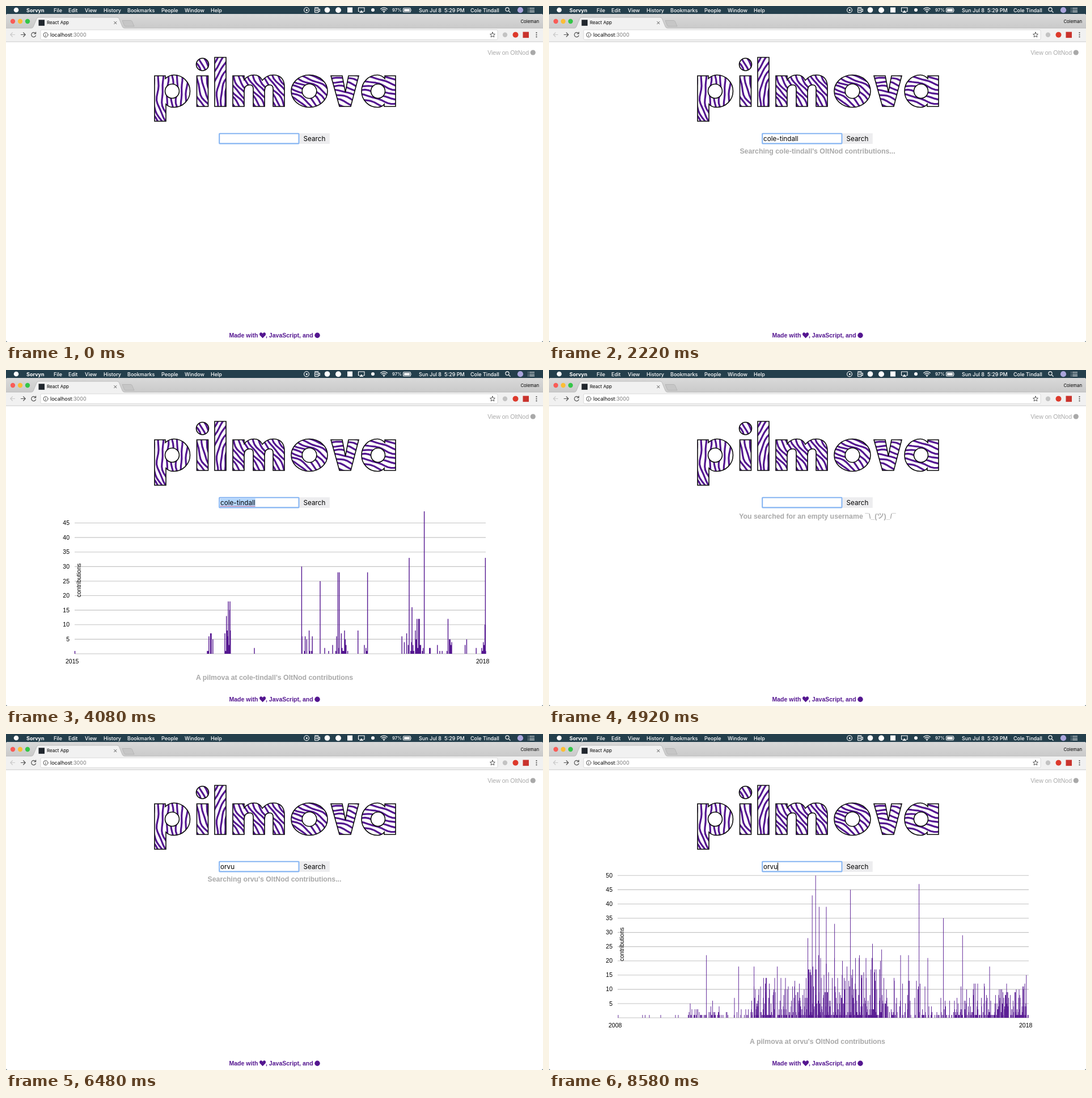
An HTML page that plays this animation: 947x592 px, repeating every 8640 ms.

```html
<!DOCTYPE html>
<html lang="en">
<head>
<meta charset="utf-8">
<title>React App</title>
<style>
html, body { margin: 0; width: 100%; height: 100%; overflow: hidden; background: #fff; }
svg { display: block; width: 947px; height: 592px; }
text { font-family: 'Liberation Sans', 'Noto Sans CJK JP', sans-serif; font-size: 10.52px; white-space: pre; }
.ui text { font-family: Inter, sans-serif; font-size: 9px; }
.menu text { fill: #fff; font-weight: 500; }
.bold { font-weight: 700; }
.mid { text-anchor: middle; }
.end { text-anchor: end; }
text.field { font-family: Inter, sans-serif; font-size: 11.7px; }
text.status { font-size: 12.31px; font-weight: 700; fill: #a9a9a9; text-anchor: middle; }
.line { fill: none; stroke-linecap: round; stroke-linejoin: round; }
</style>
</head>
<body>
<svg viewBox="0 0 947 592">
  <rect width="947" height="592" fill="#243f4c"/>
  <defs>
    <linearGradient id="strip" x2="0" y2="1">
      <stop stop-color="#d9d9d9"/><stop offset="1" stop-color="#cacaca"/>
    </linearGradient>
  </defs>
  <rect y="14" width="947" height="578" rx="3" fill="#fff"/>
  <path d="M0 39V17Q0 14 3 14H944Q947 14 947 17V39Z" fill="url(#strip)"/>

  <g class="ui menu" id="menu">
    <circle cx="18" cy="7" r="4.3" fill="#fff"/>
    <g fill="none" stroke="#fff" stroke-width="1.1">
      <circle cx="530" cy="7.2" r="4.4"/>
      <rect x="544.5" y="4" width="6.5" height="7.5" rx="1"/>
      <path d="M551 5.5H553.3V9.5H551M544 2.8H551.5M546.7 6V9.5M549 6V9.5"/>
      <path d="M623.5 9.5H621.5V3H632V9.5H630"/>
      <path d="M660.3 5.4Q666.5 .2 672.7 5.4M662.3 7.6Q666.5 4.2 670.7 7.6M664.4 9.6Q666.5 8 668.6 9.6" stroke-width="1.3"/>
      <rect x="700.5" y="3.8" width="13" height="7" rx="1.4"/>
      <circle cx="884" cy="6" r="3.1"/>
      <path d="M886.3 8.3L889.5 11.5M923 4H932M923 7.2H932M923 10.4H932M920.3 4H921.5M920.3 7.2H921.5M920.3 10.4H921.5"/>
    </g>
    <g fill="#fff">
      <rect x="529" y="6" width="2.6" height="2.6"/>
      <circle cx="566.5" cy="7" r="4.8"/>
      <circle cx="586" cy="7.2" r="5"/>
      <rect x="602" y="2.5" width="9" height="9"/>
      <path d="M623 11.8L626.8 7.6L630.6 11.8Z"/>
      <circle cx="647" cy="7" r="3"/>
      <circle cx="666.5" cy="11" r="1"/>
      <rect x="702" y="5.2" width="10" height="4.2"/>
      <path d="M714.5 6Q716 7.2 714.5 8.6Z"/>
    </g>
    <circle cx="907" cy="7.2" r="5.1" fill="#a9a5dc"/>
  </g>

  <g class="ui">
    <circle cx="12" cy="27" r="4.2" fill="#f95c57"/>
    <circle cx="25" cy="27" r="4.2" fill="#fcbd36"/>
    <circle cx="38" cy="27" r="4.2" fill="#34c648"/>
    <path d="M205 25.5H220Q221.5 25.5 222.3 27L226 35.7H211Q209.3 35.7 208.7 34.5Z" fill="#c6c6c6" stroke="#b1b1b1" stroke-width=".8"/>
    <rect y="39" width="947" height="24" fill="#f1f1f1"/>
    <path d="M0 39H45Q47.5 38.6 48.5 36L54 22.5Q55 20 57.5 20H196Q198.5 20 199.5 22.5L205 36Q206 38.6 208.5 39H947" fill="#f1f1f1" stroke="#b4b4b4" stroke-width=".8"/>
    <rect x="50" y="38.5" width="154" height="2" fill="#f1f1f1"/>
    <rect x="57.5" y="24.3" width="10.5" height="10.5" fill="#20262d"/>
    <text x="72" y="32.3" style="font-size:8px">React App</text>
    <path d="M190.7 27.5L194.9 31.7M194.9 27.5L190.7 31.7" class="line" stroke="#555" stroke-width="1"/>
    <text x="940" y="30.3" class="end" style="font-size:7.8px">Coleman</text>
    <path d="M0 63H947" stroke="#c6c6c6" stroke-width=".9"/>
    <rect x="61" y="42" width="806" height="17.3" rx="2" fill="#fff" stroke="#d2d2d2" stroke-width=".8"/>
    <g class="line" stroke="#555" stroke-width="1.2">
      <path d="M15.5 50.5H8M11.3 47L7.8 50.5L11.3 54" stroke="#c9c9c9"/>
      <path d="M26.5 50.5H34M30.7 47L34.2 50.5L30.7 54"/>
      <path d="M52 48.2A4 4 0 1 0 52.5 52M52.6 46V49H49.6"/>
      <circle cx="70" cy="50.8" r="4" stroke-width="1"/>
      <path d="M70 50.5V52.8M70 48.7V48.8" stroke-width="1.1"/>
      <path d="M858 46.2L859.3 49.2L862.4 49.5L860.1 51.6L860.8 54.8L858 53.1L855.2 54.8L855.9 51.6L853.6 49.5L856.7 49.2Z" stroke-width="1"/>
    </g>
    <text x="78" y="54">localhost<tspan fill="#777">:3000</tspan></text>
    <circle cx="880" cy="50.8" r="4.2" fill="#c3c3c3"/>
    <circle cx="898.5" cy="50.8" r="5" fill="#dd3a2c"/>
    <rect x="911.5" y="45.6" width="10.5" height="10.5" fill="#c9332d"/>
    <g fill="#555"><circle cx="935.5" cy="47.2" r="1.1"/><circle cx="935.5" cy="50.8" r="1.1"/><circle cx="935.5" cy="54.4" r="1.1"/></g>
  </g>

  <text x="922" y="85.7" class="end" fill="#a9a9a9">View on OltNod</text>
  <circle cx="929.3" cy="82" r="4.6" fill="#a9a9a9"/>

  <g id="logo"></g>

  <rect x="517.8" y="224.3" width="53" height="18.6" fill="#ededef"/>
  <rect x="376.2" y="224.8" width="140.3" height="17.6" rx=".8" fill="#fff" stroke="#86b5f2" stroke-width="2.1"/>
  <rect id="selection" x="378" y="226.3" height="15" fill="#b3d6fc"/>
  <path id="squiggle" stroke="#e0455f" stroke-width="1.3" stroke-dasharray="1.4 1.2"/>
  <text id="input" class="field" x="378" y="238"></text>
  <rect id="caret" y="226.6" width="1" height="14" fill="#000"/>
  <text x="544" y="238" class="field mid">Search</text>

  <g id="charts"></g>
  <text id="status" class="status" x="473.5"></text>

  <g class="bold" fill="#541690">
    <text x="393.5" y="584">Made with</text>
    <path d="M452.6 585.2L447.9 580.4C446 578 447.6 575.2 449.8 575.3Q451.7 575.4 452.6 577.2Q453.5 575.4 455.4 575.3C457.6 575.2 459.2 578 457.3 580.4Z"/>
    <text x="458" y="584">, JavaScript, and</text>
    <circle cx="549" cy="580.3" r="4.7"/>
  </g>
</svg>
<script>
const NS = 'http://www.w3.org/2000/svg';
const LOOP = 8640, PURPLE = '#541690';
const $ = id => document.getElementById(id);

function add(parent, tag, attrs, content) {
  const el = document.createElementNS(NS, tag);
  for (const k in attrs) el.setAttribute(k, attrs[k]);
  if (content !== undefined) el.textContent = content;
  parent.appendChild(el);
  return el;
}

function seeded(seed) {
  return () => (seed = (seed * 16807) % 2147483647) / 2147483647;
}

// Menu bar labels
const labels = {
  File: 84, Edit: 110, View: 139, History: 172, Bookmarks: 214, People: 274,
  Window: 315, Help: 361, 'Sun Jul 8': 728, '5:29 PM': 773, 'Cole Tindall': 819
};
for (const name in labels) add($('menu'), 'text', { x: labels[name], y: 10.6 }, name);
add($('menu'), 'text', { x: 36, y: 10.6, style: 'font-weight:700' }, 'Sorvyn');
add($('menu'), 'text', { x: 681, y: 10.3, style: 'font-size:7.8px' }, '97%');

// Striped wordmark
const disc = (x, y, rx, ry = rx) =>
  `M${x - rx} ${y}a${rx} ${ry} 0 1 0 ${2 * rx} 0a${rx} ${ry} 0 1 0 ${-2 * rx} 0Z`;
const stem = (x, top) => `M${x} ${top}h20V177h-20Z`;

const glyphs = [
  { cx: 293, tilt: 78, d: 'M262 123H281V128Q288 121.5 296 121.5A28.5 28.5 0 0 1 296 178.5Q287 178.5 282 173V203H262Z' + disc(293, 150, 12.5) },
  { cx: 346, tilt: 62, d: stem(336.5, 123) + disc(346.5, 103, 11) },
  { cx: 378, tilt: 106, d: stem(368, 90.5) },
  { cx: 445, tilt: 64, d: 'M400 123H420V130Q427 121.5 437 121.5Q448 121.5 452 131Q460 121.5 471 121.5Q491 121.5 491 143V177H471V146Q471 139 465 139Q456 139 456 150V177H436V146Q436 139 430 139Q420 139 420 150V177H400Z' },
  { cx: 535, tilt: 38, d: disc(535, 150, 32, 28.5) + disc(535, 150, 12.8) },
  { cx: 598, tilt: 8, d: 'M573 123H593L598.5 152L604 123H622L608 177H588Z' },
  { cx: 657, tilt: 4, d: 'M687 123H668V128Q662 121.5 655 121.5A28 28.5 0 0 0 655 178.5Q663 178.5 667 173V177H687Z' + disc(656, 150, 12.5) }
];

function stripes(phase) {
  let d = '';
  for (let k = -8; k <= 8; k++) {
    for (let x = -66; x <= 66; x += 6) {
      const y = k * 8 + 6 * Math.sin(x / 17 + phase + k * .16) + Math.sin(x / 6 + k * 2);
      d += (x === -66 ? 'M' : 'L') + x + ' ' + y.toFixed(1);
    }
  }
  return d;
}

glyphs.forEach(({ cx, tilt, d }, i) => {
  const clip = add($('logo'), 'clipPath', { id: 'glyph' + i });
  add(clip, 'path', { d, 'clip-rule': 'evenodd' });
  const g = add($('logo'), 'g', { 'clip-path': `url(#glyph${i})` });
  add(g, 'path', {
    d: stripes(i), class: 'line', stroke: PURPLE, 'stroke-width': 3.2,
    transform: `translate(${cx} 148) rotate(${tilt})`
  });
  add($('logo'), 'path', { d, fill: 'none', stroke: '#0b0b0b', 'stroke-width': 1.6 });
});

// Charts: seeded activity within busy spells, plus a few record days
function activity({ spells, peaks, step, skew, seed }) {
  const rnd = seeded(seed), bars = [...peaks];
  for (const [from, to, share, top] of spells) {
    for (let x = from; x < to; x += step) {
      const active = rnd() < share;
      const count = 1 + Math.floor(top * rnd() ** skew);
      if (active) bars.push([x, count]);
    }
  }
  return bars;
}

function chart(data) {
  const { max, year, unit, thick } = data;
  const g = add($('charts'), 'g', {});
  const label = (x, y, s, cls) => add(g, 'text', { x, y, class: cls }, s);
  for (let v = 0; v <= max; v += 5) {
    const y = 500 - v * unit;
    add(g, 'path', { d: `M121 ${y}H846`, stroke: '#c4c4c4', 'stroke-width': 1.1 });
    if (v) label(112, y + 3.6, v, 'end');
  }
  const d = activity(data).map(([x, v]) => `M${x.toFixed(1)} 500v${(-v * unit).toFixed(1)}`).join('');
  add(g, 'path', { d, stroke: PURPLE, 'stroke-width': thick });
  add(g, 'text', { class: 'mid', transform: 'translate(131.5 370.5) rotate(-90)' }, 'contributions');
  label(116.7, 516.7, year, 'mid');
  label(840.7, 516.7, 2018, 'mid');
  return g;
}

const charts = [
  chart({
    max: 45, year: 2015, unit: 5.122, thick: 1.4, step: 1.4, skew: 1.7, seed: 77,
    spells: [[355, 365, .6, 7], [386, 397, .8, 15], [522, 542, .5, 12], [555, 603, .45, 9],
      [632, 638, .7, 11], [694, 730, .7, 12], [730, 790, .35, 5], [804, 836, .3, 6], [839, 846, 1, 12]],
    peaks: [[121.5, 1], [392, 18], [395, 18], [438, 2], [521.4, 30], [554, 25], [585.4, 28], [587.8, 28],
      [620.7, 8], [637.6, 28], [711, 33], [716, 16], [737.6, 49], [779.5, 12], [845.4, 33]]
  }),
  chart({
    max: 50, year: 2008, unit: 5.014, thick: .9, step: .5, skew: 2.7, seed: 2018,
    spells: [[122, 245, .02, 2], [245, 300, .33, 6], [300, 356, .17, 8], [356, 455, .64, 14],
      [455, 588, .78, 22], [588, 676, .34, 14], [676, 715, .17, 7], [715, 846, .64, 12]],
    peaks: [[277.6, 22], [334.4, 18], [361.6, 18], [402.6, 18], [456.5, 28], [464.2, 43], [470.2, 50],
      [476.4, 39], [489, 39], [503.6, 33], [531.5, 45], [570.5, 26], [586.6, 24], [620, 22], [634, 22],
      [652.6, 47], [668, 21], [695.5, 35], [729.3, 29], [777, 18], [841.8, 15]]
  })
];

// Timeline
const typing = [
  { user: 'cole-tindall', from: 890, pace: 75 },
  { user: 'orvu', from: 5220, pace: 100 }
];
const SELECT = 3960, CLEAR = 4380;
const searching = i => ({ text: `Searching ${typing[i].user}'s OltNod contributions...`, y: 260 });
const result = i => ({ text: `A pilmova at ${typing[i].user}'s OltNod contributions`, y: 546, chart: i });
const scenes = [
  { at: 0, text: '', y: 260 },
  { at: 2100, ...searching(0) },
  { at: 3600, ...result(0) },
  { at: 4500, text: 'You searched for an empty username ¯\\_(ツ)_/¯', y: 262 },
  { at: 5820, ...searching(1) },
  { at: 7200, ...result(1) }
];

const show = (el, on) => el.setAttribute('visibility', on ? 'visible' : 'hidden');

function draw(t) {
  const { user, from, pace } = typing[t < CLEAR ? 0 : 1];
  const count = Math.max(0, Math.min(user.length, Math.floor((t - from) / pace) + 1));
  const input = $('input');
  input.textContent = user.slice(0, count);
  const width = count ? input.getComputedTextLength() : 0;

  const selected = t >= SELECT && t < CLEAR;
  show($('selection'), selected);
  show($('squiggle'), selected);
  $('selection').setAttribute('width', width);
  $('squiggle').setAttribute('d', `M378 240.2H${378 + width}`);

  const idleFrom = t < CLEAR ? -600 : CLEAR;
  const lastEdit = count ? from + (count - 1) * pace : idleFrom;
  show($('caret'), !selected && (t - lastEdit) % 1000 < 500);
  $('caret').setAttribute('x', 378 + width);

  const scene = scenes.filter(s => s.at <= t).pop();
  $('status').textContent = scene.text;
  $('status').setAttribute('y', scene.y);
  charts.forEach((g, i) => show(g, scene.chart === i));
}

const start = performance.now();
function tick() {
  draw((performance.now() - start) % LOOP);
  requestAnimationFrame(tick);
}
tick();
</script>
</body>
</html>
```
